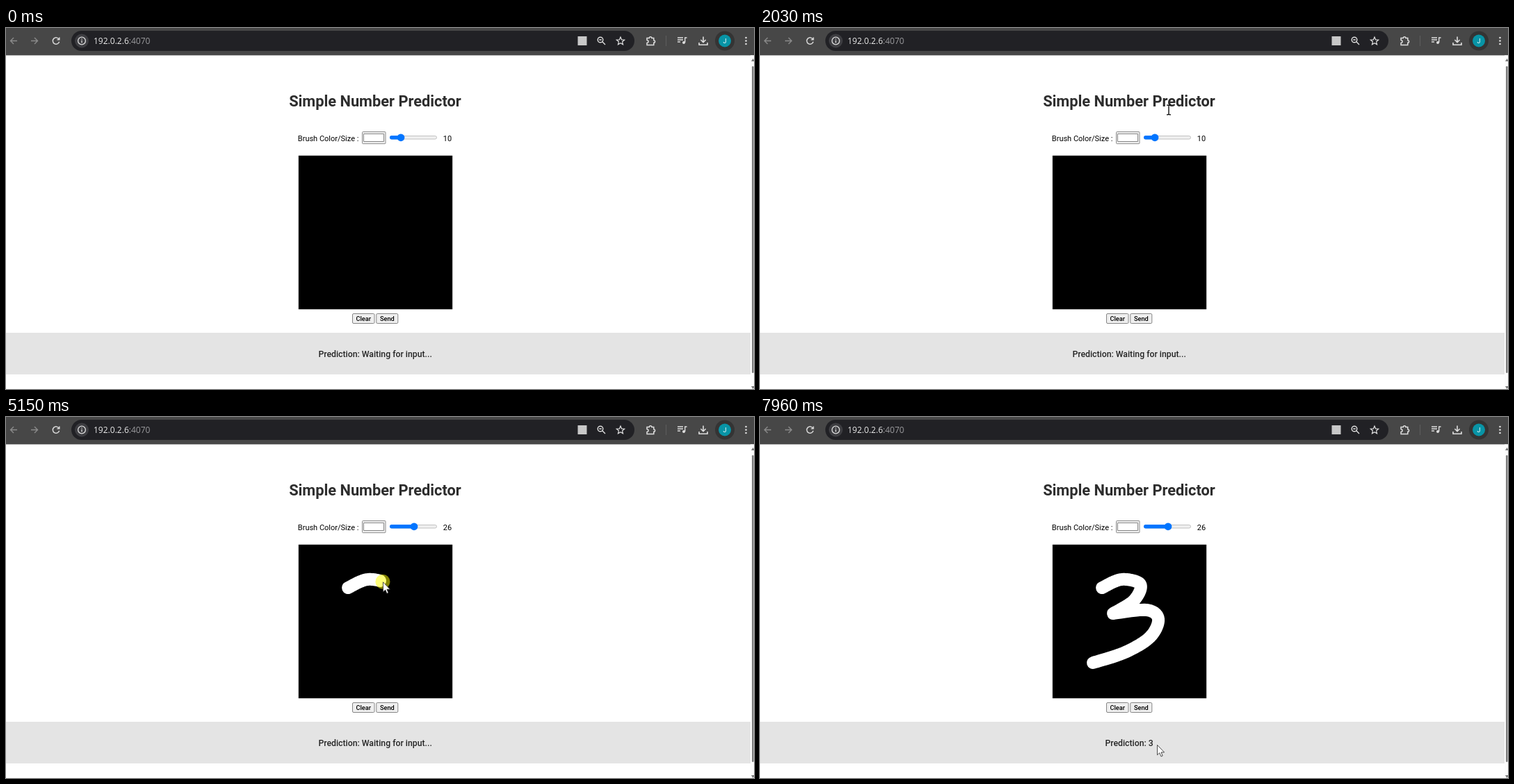
Animation, 1076 px wide and 520 px high, one loop 8 s. Source, as an HTML page with a canvas:

```html
<!DOCTYPE html>
<html lang="en">
<head>
<meta charset="utf-8">
<title>Simple Number Predictor</title>
<style>
html, body { margin: 0; width: 100%; height: 100%; overflow: hidden; background: #fff; }
canvas { display: block; }
</style>
</head>
<body>
<canvas id="stage" width="1076" height="520"></canvas>
<script>
const ctx = document.getElementById('stage').getContext('2d');
const LOOP = 8000;
const BEAT = 101;        // the screen updates once per beat
const PEN_LAG = 0.25;    // beats the ink trails behind the pointer

// Mouse button held down, in beats
const press = { open: [8, 9], mix: [14, 18], close: [19, 20], size: [29, 37], ink: [48, 62], send: [67, 68] };

// Pointer moves: [first beat, last beat, x, y]
const moves = [
  [1, 8, 530, 162], [10, 13, 526, 171], [13, 17, 488, 135], [17, 20, 588, 118],
  [20, 27, 571, 158], [29, 36, 587, 158], [41, 42, 573, 178], [42, 46, 492, 246],
  [48, 60.5, 479, 354], [61, 64, 545, 421], [64, 66, 551, 421], [76, 79, 571, 472]
];

// The two bows of the digit
const upper = [[492, 246], [520, 234], [547, 241], [538, 264], [508, 283]];
const lower = [[508, 283], [556, 278], [573, 291], [561, 317], [525, 339], [479, 354]];

const clamp = (v, a, b) => Math.min(b, Math.max(a, v));
const ease = f => f * f * (3 - 2 * f);
const during = (n, [a, b]) => n >= a && n < b;
const inside = ([px, py], x, y, w, h) => px >= x && px <= x + w && py >= y && py <= y + h;

// Catmull-Rom curve through pts, f from 0 to 1
function spline(pts, f) {
  const last = pts.length - 1;
  const i = Math.min(last - 1, Math.floor(f * last)), u = f * last - i;
  const [a, b, c, d] = [i - 1, i, i + 1, i + 2].map(k => pts[clamp(k, 0, last)]);
  return [0, 1].map(k => b[k] + u / 2 * (c[k] - a[k]
    + u * (2 * a[k] - 5 * b[k] + 4 * c[k] - d[k] + u * (3 * (b[k] - c[k]) + d[k] - a[k]))));
}

function penAt(n) {
  return n < 55 ? spline(upper, clamp((n - 48) / 7, 0, 1)) : spline(lower, Math.min(1, (n - 55) / 5.5));
}

function pointerAt(n) {
  if (during(n, press.ink) && n < 61) return penAt(n);
  let x = 850, y = 375;
  for (const [a, b, tx, ty] of moves) {
    if (n < a) break;
    const f = ease(Math.min(1, (n - a) / (b - a)));
    x += (tx - x) * f;
    y += (ty - y) * f;
  }
  return [x, y];
}

function rect(x, y, w, h, fill) {
  ctx.fillStyle = fill;
  ctx.fillRect(x, y, w, h);
}

function box(x, y, w, h, r, fill, line) {
  ctx.beginPath();
  ctx.roundRect(x, y, w, h, r);
  ctx.fillStyle = fill;
  ctx.fill();
  if (line) {
    ctx.strokeStyle = line;
    ctx.lineWidth = 1;
    ctx.stroke();
  }
}

function disc(x, y, r, fill, line, width = 1) {
  ctx.beginPath();
  ctx.arc(x, y, r, 0, Math.PI * 2);
  if (fill) { ctx.fillStyle = fill; ctx.fill(); }
  if (line) { ctx.strokeStyle = line; ctx.lineWidth = width; ctx.stroke(); }
}

function text(str, x, y, font, fill, align = 'center') {
  ctx.font = font;
  ctx.fillStyle = fill;
  ctx.textAlign = align;
  ctx.fillText(str, x, y);
}

function icon(x, y, d, color, width = 1.4, fill = false) {
  const path = new Path2D(d);
  ctx.save();
  ctx.translate(x, y);
  ctx.strokeStyle = ctx.fillStyle = color;
  ctx.lineWidth = width;
  if (fill) ctx.fill(path); else ctx.stroke(path);
  ctx.restore();
}

function star(x, y, r, color) {
  ctx.beginPath();
  for (let i = 0; i < 10; i++) {
    const a = i * Math.PI / 5, d = i % 2 ? r * .45 : r;
    ctx.lineTo(x + d * Math.sin(a), y - d * Math.cos(a));
  }
  ctx.closePath();
  ctx.strokeStyle = color;
  ctx.lineWidth = 1.2;
  ctx.stroke();
}

const roboto = (size, weight = 400) => `${weight} ${size}px Roboto, sans-serif`;

function toolbar() {
  const ink = '#dedede', dim = '#8b8b8b', font = '12px "Open Sans", sans-serif';
  rect(0, 0, 1076, 39.4, '#474747');
  icon(11, 18.5, 'M5 0H-4.5M0-4.5L-4.5 0 0 4.5', dim);
  icon(41, 18.5, 'M-5 0H4.5M0-4.5L4.5 0 0 4.5', dim);
  icon(72, 18.5, 'M4.2-2.2A4.7 4.7 0 1 0 4.6 1.2M4.8-5V-1.6H1.3', ink);
  box(94, 4, 810, 29, 14.5, '#212125');
  disc(109, 18.5, 10, '#3d3d41');
  disc(109, 18.5, 5.4, null, ink, 1.3);
  icon(109, 18.5, 'M0-3.2V-1.9M0-.8V3', ink, 1.3);
  text('192.0.2.6', 126, 22.7, font, '#e8e8e8', 'left');
  text(':4070', 126 + ctx.measureText('192.0.2.6').width, 22.7, font, '#9a9a9d', 'left');

  rect(822.5, 12, 13, 13, '#c8c8c8');
  disc(855, 17, 3.8, null, ink, 1.4);
  icon(855, 17, 'M2.8 2.8L7 7M-1.8 0H1.8', ink);
  star(884, 19, 6, ink);
  icon(927.5, 18.5, 'M-5.5-4H-2.2A1.8 1.8 0 0 1 1.4-4H4.3V-.8A1.8 1.8 0 0 1 4.3 2.8V6H-5.5V3A2 2 0 0 0-5.5-1Z', ink, 1.5);
  rect(949, 11, 1, 15, '#5e5e5e');
  icon(972, 18, 'M-6-4H2M-6-1H2M-6 2H-2M4.7 3V-4H7.5', ink);
  disc(975, 21, 2, ink);
  icon(1003, 18.5, 'M0-6V2M-3.6-1.5L0 2.2 3.6-1.5M-6 2.5V5.7H6V2.5', ink, 1.6);
  disc(1034, 18.5, 14, '#343434');
  disc(1034, 18.5, 9, '#0894a6');
  text('J', 1034, 22, roboto(9), '#fff');
  for (let i = -1; i <= 1; i++) disc(1064.5, 18.5 + 4.5 * i, 1.3, ink);
}

function scrollbar() {
  rect(1071, 39.4, 5, 481, '#fcfcfc');
  box(1073, 55, 2.6, 442, 1.3, '#7d7d7d');
  icon(1074.5, 46, 'M-2.5 2L0-2 2.5 2Z', '#777', 1, true);
  icon(1074.5, 518, 'M-2.5-2L0 2 2.5-2Z', '#777', 1, true);
}

function slider(size, hover, active) {
  const color = active ? '#3793ff' : hover ? '#005cc8' : '#0075ff';
  const x = 568 + (size - 10) * 19 / 16;
  box(552.5, 155.5, 67, 4.5, 2.2, hover ? '#e5e5e5' : '#efefef', '#c2c2c2');
  box(552, 155, x - 552, 5.4, 2.7, color);
  disc(x, 157.8, 5.4, color);
  text(size, 628.8, 163, roboto(11), '#000', 'left');
}

function button(label, x, w, fill) {
  box(x + .5, 411.5, w - 1, 14, 1.5, fill, '#858585');
  text(label, x + w / 2, 422, roboto(9.2, 500), '#000');
}

function digit(n) {
  const end = Math.max(48.05, n - PEN_LAG);
  ctx.save();
  ctx.beginPath();
  for (let s = 48; s < Math.min(61, end); s += .1) ctx.lineTo(...penAt(s));
  ctx.lineTo(...penAt(end));
  ctx.strokeStyle = '#fff';
  ctx.lineWidth = 18;
  ctx.lineCap = ctx.lineJoin = 'round';
  ctx.stroke();
  ctx.restore();
}

function page(n, color, picking) {
  const seen = pointerAt(n - 1);   // hover reacts one beat late
  text('Simple Number Predictor', 531, 113, roboto(21.8, 700), '#2d2d2d');
  text('Brush Color/Size :', 419.8, 163, roboto(11), '#000', 'left');
  const lit = picking || inside(seen, 512, 149, 34, 18);
  box(512.5, 149.5, 33.5, 17.2, 1, lit ? '#e5e5e5' : '#efefef', lit ? '#5c5c5c' : '#8a8a8a');
  box(514.5, 152.5, 29, 11, 0, color, '#868686');

  const size = Math.round(pointerAt(clamp(n, ...[29, 36]))[0] - 561);
  slider(size, inside(seen, 552, 152, 68, 12), during(n, press.size));

  rect(420.8, 183.8, 221.4, 221.4, '#000');
  if (n >= press.ink[0]) digit(n);

  const over = inside(seen, 532, 411, 32, 15);
  button('Clear', 498, 32.5, '#efefef');
  button('Send', 532.3, 32, during(n, press.send) ? '#f5f5f5' : over ? '#e5e5e5' : '#efefef');
  rect(0, 439, 1071, 60, '#e4e4e4');
  const result = n < press.send[1] ? 'Waiting for input...' : n < 73 ? 'Processing...' : '3';
  text('Prediction: ' + result, 531.1, 474, roboto(12.25, 500), '#252525');
}

function picker(ring, rgb, color) {
  ctx.save();
  ctx.shadowColor = 'rgba(0,0,0,.25)';
  ctx.shadowBlur = 36;
  ctx.shadowOffsetY = 10;
  box(513.5, 167.5, 157.5, 170.5, 5, '#fff');
  ctx.restore();
  box(513.5, 167.5, 157.5, 170.5, 5, '#fff', 'rgba(0,0,0,.22)');

  ctx.save();
  ctx.beginPath();
  ctx.roundRect(513.5, 168, 157.5, 94, [4, 4, 0, 0]);
  ctx.clip();
  const tone = ctx.createLinearGradient(513, 0, 671, 0);
  tone.addColorStop(0, '#fff');
  tone.addColorStop(1, '#f00');
  rect(513, 168, 158, 94, tone);
  const shade = ctx.createLinearGradient(0, 168, 0, 262);
  shade.addColorStop(0, 'rgba(0,0,0,0)');
  shade.addColorStop(1, '#000');
  rect(513, 168, 158, 94, shade);
  disc(...ring, 5.2, color, '#000', 1.6);
  disc(...ring, 4, null, '#fff', 1.2);
  ctx.restore();

  icon(527, 278, 'M-4.6 4.6L-4 2 1-3 3 -1 -2 4Z', '#111', 1.2);
  icon(527, 278, 'M-.6-3.4L.6-4.4 1.7-3.4 3.2-4.9A1.2 1.2 0 0 1 4.9-3.2L3.4-1.7 4.4-.6 3.4.6Z', '#111', 1, true);
  disc(552, 278, 10.5, color, '#d2d2d2');
  const hue = ctx.createLinearGradient(573, 0, 661, 0);
  for (let i = 0; i <= 6; i++) hue.addColorStop(i / 6, `hsl(${360 - i * 60} 100% 50%)`);
  rect(571, 273, 90, 8.5, hue);
  disc(572.7, 278, 6, '#fff', '#c4c4c4', .8);
  disc(572.7, 278, 4.7, '#f00');
  rgb.forEach((c, i) => {
    const x = 528.5 + 40.4 * i;
    box(x, 293.5, 35.5, 21, 2, '#fff', '#d8d8d8');
    text(c, x + 17.7, 307, roboto(9.6), '#111');
    text('RGB'[i], 548 + 39.1 * i, 329, roboto(8.4), '#222');
  });
  icon(647.5, 326.5, 'M-1.6-1.2L0-2.8 1.6-1.2M-1.6 1.2L0 2.8 1.6 1.2', '#222', 1);
}

function pointer(n, pos) {
  const [x, y] = pos;
  if (Object.values(press).some(p => during(n, p))) disc(x, y, 10.5, 'rgba(255,255,0,.52)');
  if (inside(pos, 407, 92, 248, 40)) {
    icon(x, y, 'M-3-6.8H-1L0-6 1-6.8H3M0-6V6M-3 6.8H-1L0 6 1 6.8H3', '#000', 1.3);
    return;
  }
  const arrow = 'M.5.5V14.8L3.7 11.8 6 17 8.2 16 6 11H10.6Z';
  icon(x, y, arrow, '#fff', 1, true);
  icon(x, y, arrow, '#222', .8);
}

function draw(t) {
  const n = Math.floor((t + 24) / BEAT);
  const pos = pointerAt(n);
  const picking = n >= press.open[1] && n < press.close[0];
  const ring = during(n, press.mix) ? [Math.max(513, pos[0]), Math.max(168, pos[1])] : [513, 168];
  const sat = (ring[0] - 513) / 158, val = 1 - (ring[1] - 168) / 94;
  const rgb = [1, 1 - sat, 1 - sat].map(c => Math.round(255 * val * c));
  const color = `rgb(${rgb})`;

  rect(0, 0, 1076, 520, '#fff');
  page(n, color, picking);
  toolbar();
  scrollbar();
  if (picking) picker(ring, rgb, color);
  if (n >= 1) pointer(n, pos);
}

const start = performance.now();
function tick() {
  draw((performance.now() - start) % LOOP);
  requestAnimationFrame(tick);
}
tick();
</script>
</body>
</html>
```
